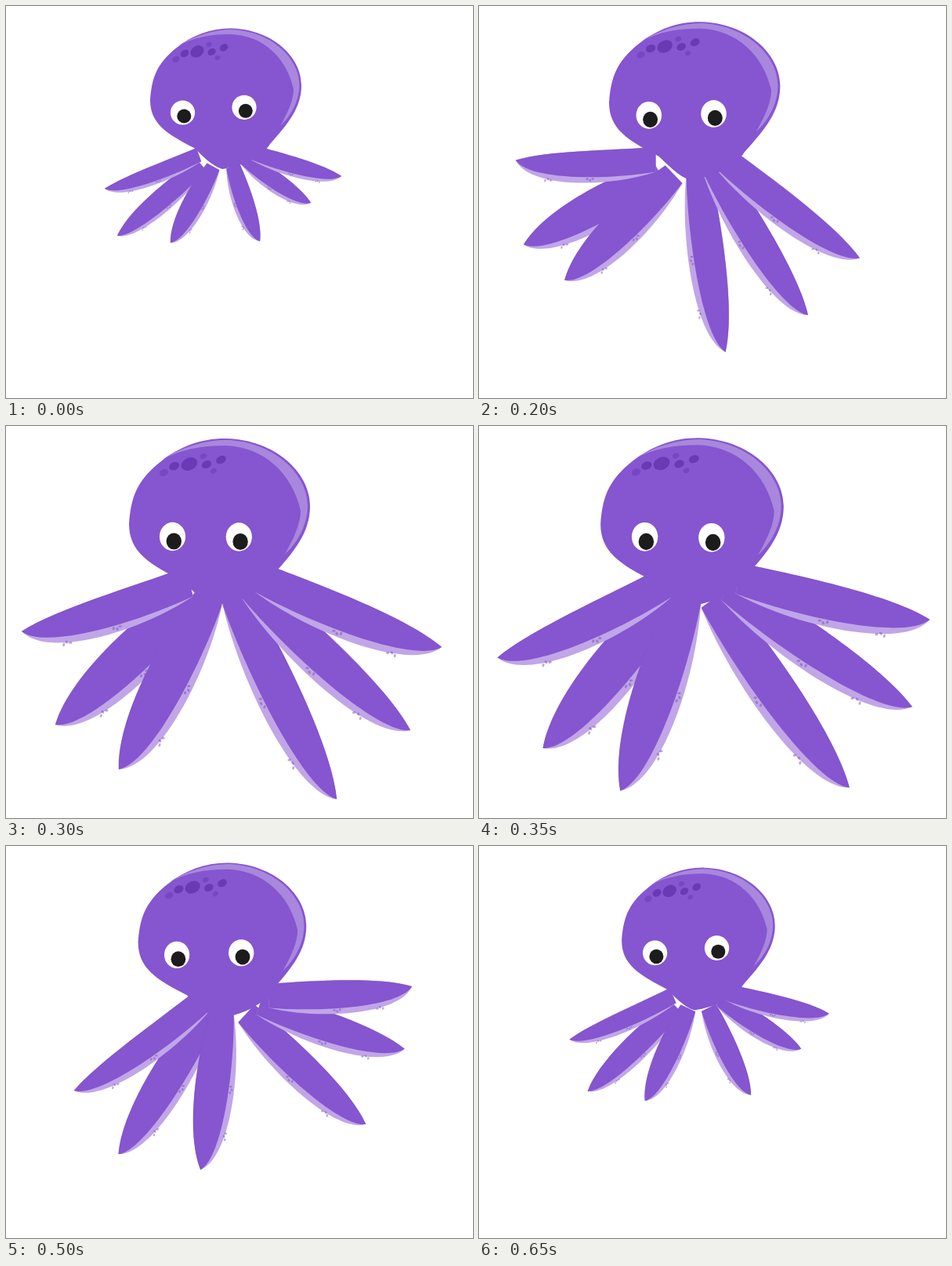
Recreate the animation shown at these times as an HTML page with a canvas. Size 596x500 px, loop 0.7 s.

```html
<!DOCTYPE html>
<html lang="en">
<head>
<meta charset="utf-8">
<title>Octopus</title>
<style>
  html, body { margin: 0; width: 596px; height: 500px; overflow: hidden; background: #fff; }
  canvas { display: block; }
</style>
</head>
<body>
<canvas id="stage" width="596" height="500"></canvas>
<script>
const ctx = document.getElementById('stage').getContext('2d');
const STEP = 50, STEPS = 14;
const PURPLE = '#8655d0', PALE = '#c0a6e7', SHINE = '#a987dd', SEAM = 'rgba(84,48,150,.3)';

// Arms in paint order: tip at rest and at full stretch, bulge of the back edge, share of the swing
const ARMS = [
  { rest: [142, 293], full: [63, 381], bulge: 13, sway: .88 },
  { rest: [210, 302], full: [144, 438], bulge: 13, sway: 1.17 },
  { rest: [126, 233], full: [20, 262], bulge: 6, sway: .93 },
  { rest: [324, 300], full: [422, 476], bulge: 10, sway: 1.17 },
  { rest: [389, 251], full: [516, 388], bulge: 9, sway: 1.13 },
  { rest: [428, 217], full: [556, 282], bulge: 8, sway: 1.02 },
];
const FRONT = 13, UNDER = 18, ROOT = 9;

const HEAD = new Path2D('M184 120C186 95 190 75 218 53C238 37 262 28 288 28.5C340 30 377 65 377 101' +
  'C377 130 360 150 337 176C325 195 300 204 276 208C262 204 250 190 240 181C205 163 184 150 184 120Z');
const GLOSS = new Path2D('M219 51C240 38 265 30 288 30C338 32 374.5 66 374.5 101C374 122 364 140 350 153' +
  'C360 135 367 120 367 106C358 66 328 37 286 36C260 36 240 40 219 51Z');

// x, y, radius
const SPOTS = [[217, 68, 4.3], [228, 60.5, 5], [244, 58, 8], [259, 49, 3.2],
  [262.5, 58.5, 4.8], [278, 53, 4.9], [270, 66, 3]];

const mix = (a, b, p) => a + (b - a) * p;

// Stretch grows steadily, holds briefly, then shrinks back from the given peak
const stretch = (n, peak) => Math.min(n / 6, 1.07, peak - (n - 7) / 6);

// Swing in degrees: one way while growing, the other way while shrinking
const swingAt = n => n < 6
  ? 16.5 * Math.sin(Math.PI * (n / 6) ** 1.15)
  : -18.5 * Math.sin(Math.PI * (n - 6) / 7.5);

function turn(x, y, cx, cy, degrees) {
  const a = degrees * Math.PI / 180, c = Math.cos(a), s = Math.sin(a);
  return [cx + (x - cx) * c - (y - cy) * s, cy + (x - cx) * s + (y - cy) * c];
}

function ellipse(x, y, rx, ry, color, tilt = 0) {
  ctx.fillStyle = color;
  ctx.beginPath();
  ctx.ellipse(x, y, rx, ry, tilt, 0, 2 * Math.PI);
  ctx.fill();
}

// Returns a function from (share of length, sideways offset) to the stage
function armFrame({ rest, full, sway }, p, swing) {
  const tip = turn(mix(rest[0], full[0], p), mix(rest[1], full[1], p), 275, 190, sway * swing);
  const reachIn = .22 * (1 + .37 * p);
  const x = 280 - .8 * swing + (rest[0] - 280) * reachIn;
  const y = 178 + 5 * p + (rest[1] - 180) * reachIn;
  const dx = tip[0] - x, dy = tip[1] - y;
  const across = (rest[0] < 280 ? 1 : -1) * (1 + 1.1 * p) / Math.hypot(dx, dy);
  return (u, v) => [x + u * dx - v * across * dy, y + u * dy + v * across * dx];
}

function drawArm(arm, p, swing) {
  const at = armFrame(arm, p, swing);
  const back = () => {
    const b = arm.bulge * 1.15;
    ctx.beginPath();
    ctx.moveTo(...at(0, ROOT));
    ctx.bezierCurveTo(...at(.32, b), ...at(.78, b), ...at(1, 0));
  };
  const shape = (depth, color) => {
    const f = -depth * 1.15;
    back();
    ctx.bezierCurveTo(...at(.9, f), ...at(.35, f), ...at(0, -ROOT));
    ctx.closePath();
    ctx.fillStyle = color;
    ctx.fill();
  };
  shape(UNDER, PALE);
  shape(FRONT, PURPLE);
  back();
  ctx.strokeStyle = SEAM;
  ctx.lineWidth = .8;
  ctx.stroke();
  for (let i = 0; i < 6; i++) {
    const [x, y] = at((i < 3 ? .45 : .75) + i % 3 * .02, -14 - i % 2);
    ellipse(x, y, 1.2 + p, .8 + .7 * p, 'rgba(110,70,170,.45)', i);
  }
}

function drawHead(p) {
  ctx.save();
  ctx.translate(321, 95);
  ctx.scale(1 + .197 * p, 1 + .187 * p);
  ctx.translate(-321, -95);
  ctx.fillStyle = PURPLE;
  ctx.fill(HEAD);
  ctx.fillStyle = SHINE;
  ctx.fill(GLOSS);
  ctx.restore();

  ctx.save();
  ctx.translate(295.7, 58 - 9.5 * p);
  ctx.scale(1 + .197 * p, 1 + .1 * p);
  for (const [x, y, r] of SPOTS)
    ellipse(x - 295.7, y - 58, 1.14 * r, .88 * r, r < 4.5 ? '#7846c2' : '#6a39b4', -.55);
  ctx.restore();
}

function drawEye(from, to, p) {
  const x = mix(from[0], to[0], p), y = mix(from[1], to[1], p);
  ellipse(x, y, 15.6 + p, 15.6 + 2.6 * p, '#fff');
  ellipse(x + 1.8, y + 4.5 + 1.5 * p, 9 + .7 * p, 9 + 1.6 * p, '#1c1c1c');
}

function draw() {
  const n = Math.floor(performance.now() / STEP) % STEPS;
  const head = stretch(n, 1.07), reach = stretch(n, 1.13), swing = swingAt(n);
  ctx.clearRect(0, 0, 596, 500);
  for (const arm of ARMS) drawArm(arm, reach, swing);
  drawHead(head);
  drawEye([225.5, 136], [212.5, 141], head);
  drawEye([304, 129.3], [297.3, 141.5], head);
  requestAnimationFrame(draw);
}
draw();
</script>
</body>
</html>
```
